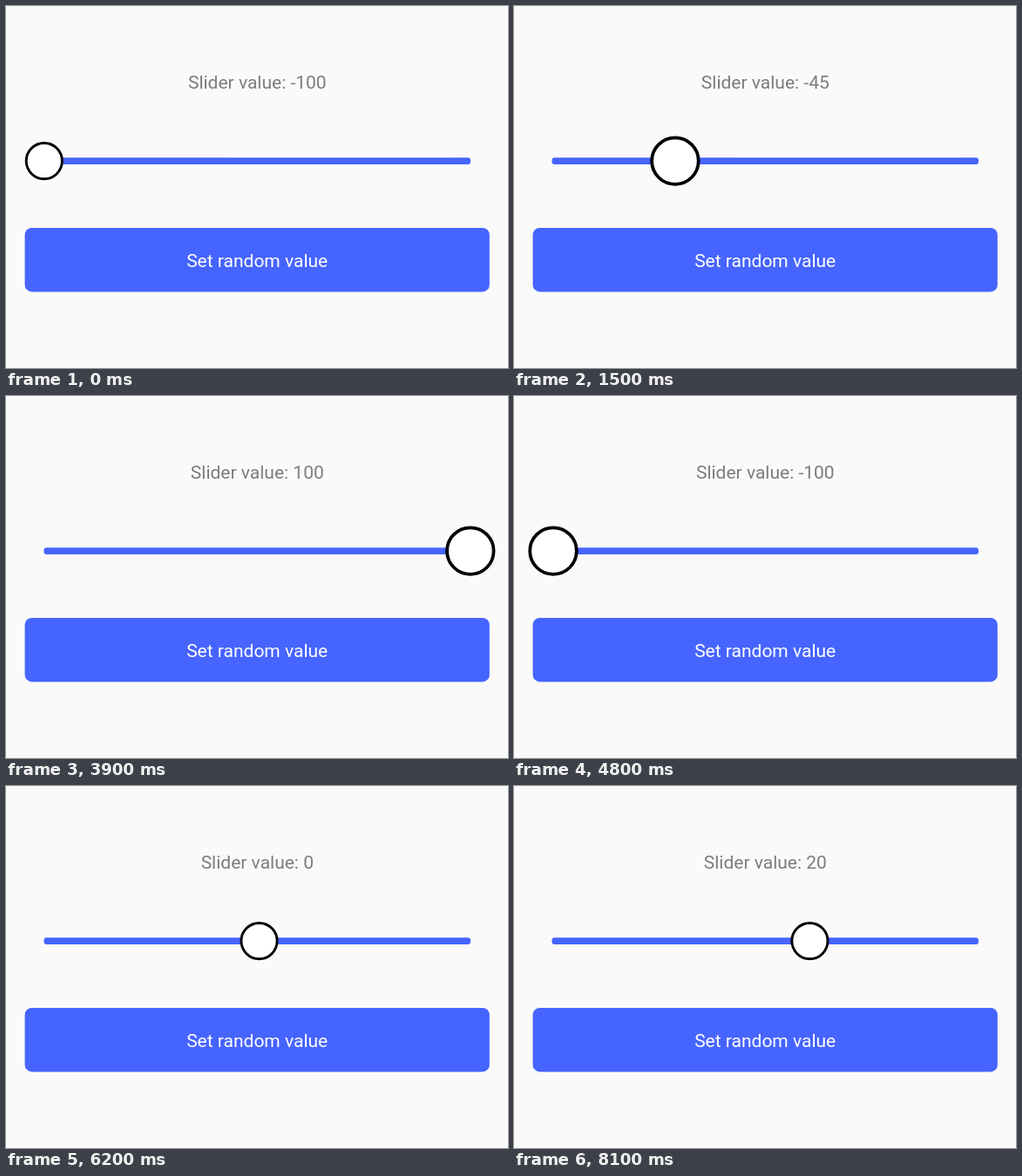
These frames come from a looping animation (576x416 px, 9.2 s). An HTML page:

```html
<!DOCTYPE html>
<html lang="en">
<head>
<meta charset="utf-8">
<title>Slider</title>
<style>
  html, body { margin: 0; width: 100%; height: 100%; overflow: hidden; background: #fafafa; }
  svg { display: block; width: 576px; height: 416px; }
  text { font: 21px Roboto, "Liberation Sans", sans-serif; text-anchor: middle; }
</style>
</head>
<body>
<svg viewBox="0 0 576 416">
  <rect width="576" height="416" fill="#fafafa"/>
  <text id="label" x="288.3" y="95.2" fill="#7c7c7c"></text>
  <rect x="43.5" y="174.3" width="489.5" height="7.6" rx="3" fill="#4664ff"/>
  <circle id="thumb" r="20.6" fill="#fff" stroke="#000" stroke-width="2.9"/>
  <rect x="21.6" y="255" width="533.2" height="73.4" rx="8" fill="#4664ff"/>
  <text x="288.2" y="300.2" fill="#fff">Set random value</text>
</svg>
<script>
const LOOP = 9200;
const TEXT_LAG = 8;
const label = document.getElementById("label");
const thumb = document.getElementById("thumb");

// Each move: start time, end time, slider value reached. Equal times mean a jump.
const moves = [
  [1150, 1964, 45.2],
  [3000, 3600, 100],
  [3900, 4650, -99.5],
  [4820, 5700, 0.9],
  [6400, 6400, -78.6],
  [7400, 7400, 20.9]
];

// Each grip: touch down, release.
const grips = [[920, 2330], [2820, 5840]];
const GROW = 200;

const clamp = p => Math.min(1, Math.max(0, p));
const smooth = p => p * p * (3 - 2 * p);

function valueAt(time) {
  let value = -100;
  for (const [start, end, goal] of moves) {
    if (time < start) break;
    const p = end > start ? clamp((time - start) / (end - start)) : 1;
    value += (goal - value) * smooth(p);
  }
  return value;
}

function scaleAt(time) {
  let held = 0;
  for (const [down, up] of grips) {
    held += smooth(clamp((time - down) / GROW)) - easeOut(clamp((time - up) / GROW));
  }
  return 1 + 0.3 * held;
}

function easeOut(p) {
  return 1 - (1 - p) ** 3;
}

function draw(time) {
  const x = 43.8 + (valueAt(time) + 100) / 200 * 489;
  thumb.setAttribute("transform", `translate(${x} 178.1) scale(${scaleAt(time)})`);
  label.textContent = "Slider value: " + Math.floor(valueAt(time - TEXT_LAG));
}

const origin = performance.now();
function tick() {
  draw((performance.now() - origin) % LOOP);
  requestAnimationFrame(tick);
}
tick();
</script>
</body>
</html>
```
